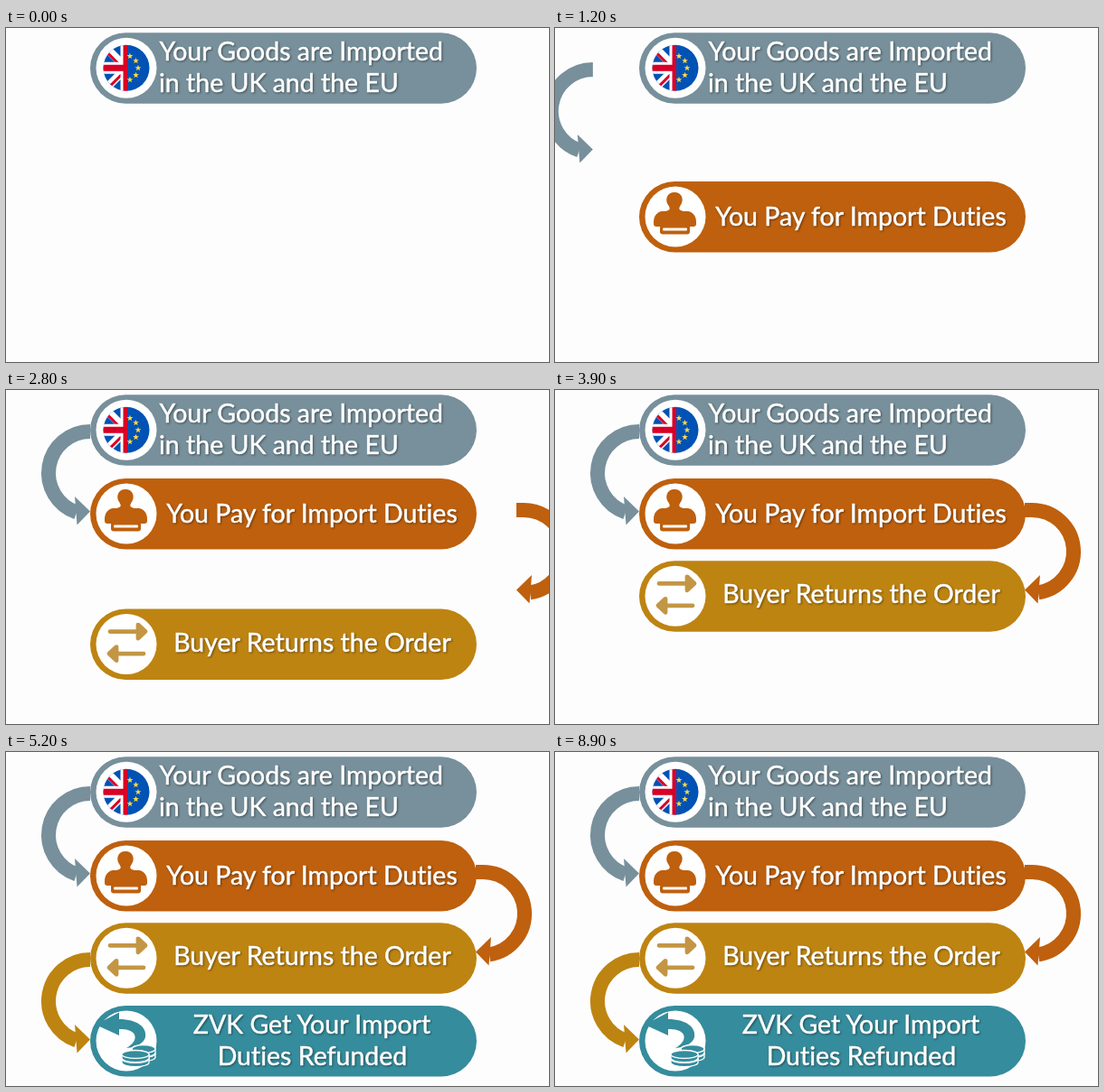
Write an HTML page that moves like this. It is 600 px wide and 370 px high and loops after 9000 ms.

```html
<!DOCTYPE html>
<html lang="en">
<head>
<meta charset="utf-8">
<title>Import duty refunds</title>
<style>
  html, body { margin: 0; width: 100%; height: 100%; overflow: hidden; background: #fefdfe; }
  svg { display: block; width: 100%; height: 100%; }
  text {
    font: 28.5px Lato, "Open Sans", sans-serif;
    font-variant-ligatures: none;
    fill: #fff; stroke: #fff; stroke-width: .5px;
    filter: drop-shadow(1px 1.5px 1px rgba(0, 0, 0, .45));
  }
  .middle { text-anchor: middle; }
</style>
</head>
<body>
<svg id="stage" viewBox="0 0 600 370"></svg>
<script>
const LOOP = 9000, STEP = 100;
const SLATE = '#77909b', ORANGE = '#be600e', GOLD = '#be8411', TEAL = '#358c9c';

function star(cx, cy, r) {
  const points = Array.from({ length: 10 }, (_, i) => {
    const a = i * Math.PI / 5 - Math.PI / 2, d = i % 2 ? r * .4 : r;
    return `${cx + d * Math.cos(a)},${cy + d * Math.sin(a)}`;
  });
  return `<polygon points="${points.join(' ')}" fill="#ffda44"/>`;
}

// Icons are drawn around the centre of their white disc.
const stars = [-2, -1, 0, 1, 2].map(i => {
  const a = i * Math.PI / 5.2;
  return star(-1 + 14 * Math.cos(a), 14 * Math.sin(a), 3.6);
}).join('');

const flags = `
  <clipPath id="round"><circle r="25.5"/></clipPath>
  <clipPath id="left"><rect x="-26" y="-26" width="27" height="52"/></clipPath>
  <g clip-path="url(#round)">
    <rect x="-26" y="-26" width="52" height="52" fill="#0052b4"/>
    <g clip-path="url(#left)" fill="none">
      <path d="M-26-26 26 26M-26 26 26-26" stroke="#fff" stroke-width="9"/>
      <path d="M-27-23 0 4M-25 27 2 0" stroke="#d80027" stroke-width="3"/>
      <path d="M0-26V26M-26 0H26" stroke="#fff" stroke-width="13"/>
      <path d="M0-26V26M-26 0H26" stroke="#d80027" stroke-width="7"/>
    </g>
    ${stars}
  </g>`;

const stamp = `
  <g fill="${ORANGE}">
    <path d="M-1-27C7-27 10-19 6-13C3-9 4-7 9-6H14C20-5 23 0 23 6V8Q23 11 20 11H-21Q-24 11-24 8V6C-24 0-21-5-15-6H-11C-6-7-5-9-8-13C-12-19-9-27-1-27Z"/>
    <rect x="-17" y="9" width="33" height="10.5" rx="3"/>
    <rect x="-14" y="12.5" width="27" height="3" rx="1" fill="#fff"/>
  </g>`;

const swap = `
  <path d="M-18-14H20M13-21.5 21-14 13-6.5ZM19 10.5H-18M-11 3-19 10.5-11 18Z"
    fill="#c39645" stroke="#c39645" stroke-width="4.8" stroke-linecap="round" stroke-linejoin="round"/>`;

const coin = (x, y, rx) =>
  `<path d="M${x - rx} ${y}v4a${rx} 4.6 0 0 0 ${2 * rx} 0v-4a${rx} 4.6 0 0 0 ${-2 * rx} 0Z"/>
   <ellipse cx="${x}" cy="${y}" rx="${rx}" ry="4.4"/>`;

const refund = `
  <g fill="${TEAL}">
    <path d="M-34-18-8-31.5V-24C12-24 23-15 21-4C19 3 11 7 0 8C8 3 11-2 9-7C6-12 0-13-8-13V-6Z"/>
    <g stroke="#fff" stroke-width="1.3">
      ${coin(19, 14, 13)}${coin(19, 9, 13)}${coin(10, 20, 15)}${coin(10, 15, 15)}
    </g>
  </g>`;

// Each line of text: x, baseline below the pill top, words.
function pill(id, color, icon, lines, align = 'middle') {
  const words = lines.map(([x, y, s]) => `<text class="${align}" x="${x}" y="${y}">${s}</text>`);
  return `<g id="${id}">
    <rect x="93" width="427" height="78.4" rx="39.2" fill="${color}"/>
    <circle cx="133" cy="39" r="33.5" fill="#fff"/>
    <g transform="translate(133 39)">${icon}</g>${words.join('')}</g>`;
}

function arrow(id, color, flip, lead) {
  const end = 46 + Math.sqrt(46 * 46 - (15 - lead) ** 2);
  return `<g id="${id}"><g transform="scale(${flip} 1)">
    <path d="M0 0H${-lead}A46 46 0 0 0 -15 ${end}" fill="none" stroke="${color}" stroke-width="16"/>
    <path d="M0 88.5-17 72-14.5 103.5Z" fill="${color}"/></g></g>`;
}

const stage = document.getElementById('stage');
stage.innerHTML =
  pill('import', SLATE, flags, [[169.5, 31, 'Your Goods are Imported'], [169, 66, 'in the UK and the EU']], 'start') +
  pill('pay', ORANGE, stamp, [[338, 49, 'You Pay for Import Duties']]) +
  pill('return', GOLD, swap, [[338.5, 47, 'Buyer Returns the Order']]) +
  pill('refund', TEAL, refund, [[338, 31, 'ZVK Get Your Import'], [338.5, 66, 'Duties Refunded']]) +
  arrow('toPay', SLATE, 1, 0) + arrow('toReturn', ORANGE, -1, 8) + arrow('toRefund', GOLD, 1, 0);

// Every part flies in from just outside the stage: dx, dy is its starting offset.
const parts = [
  { id: 'import', x: 0, y: 5.3, dx: 0, dy: 0, start: 0, time: 1 },
  { id: 'pay', x: 0, y: 98, dx: 0, dy: 272, start: 1100, time: 136 },
  { id: 'toPay', x: 93, y: 46, dx: -93, dy: 0, start: 1110, time: 200 },
  { id: 'return', x: 0, y: 189.3, dx: 0, dy: 181, start: 2704, time: 136 },
  { id: 'toReturn', x: 519, y: 133, dx: 81, dy: 0, start: 2711, time: 200 },
  { id: 'refund', x: 0, y: 281, dx: 0, dy: 89, start: 3900, time: 136 },
  { id: 'toRefund', x: 93, y: 230, dx: -93, dy: 0, start: 3900, time: 130 },
].map(p => ({ ...p, node: document.getElementById(p.id) }));

function draw(now) {
  const t = Math.floor(now % LOOP / STEP) * STEP;
  for (const p of parts) {
    const left = 1 - Math.min(1, Math.max(0, (t - p.start) / p.time));
    p.node.setAttribute('transform', `translate(${p.x + p.dx * left} ${p.y + p.dy * left})`);
    p.node.setAttribute('visibility', t >= p.start ? 'visible' : 'hidden');
  }
}

let begin;
function tick(now) {
  begin ??= now;
  draw(now - begin);
  requestAnimationFrame(tick);
}
draw(0);
requestAnimationFrame(tick);
</script>
</body>
</html>
```
